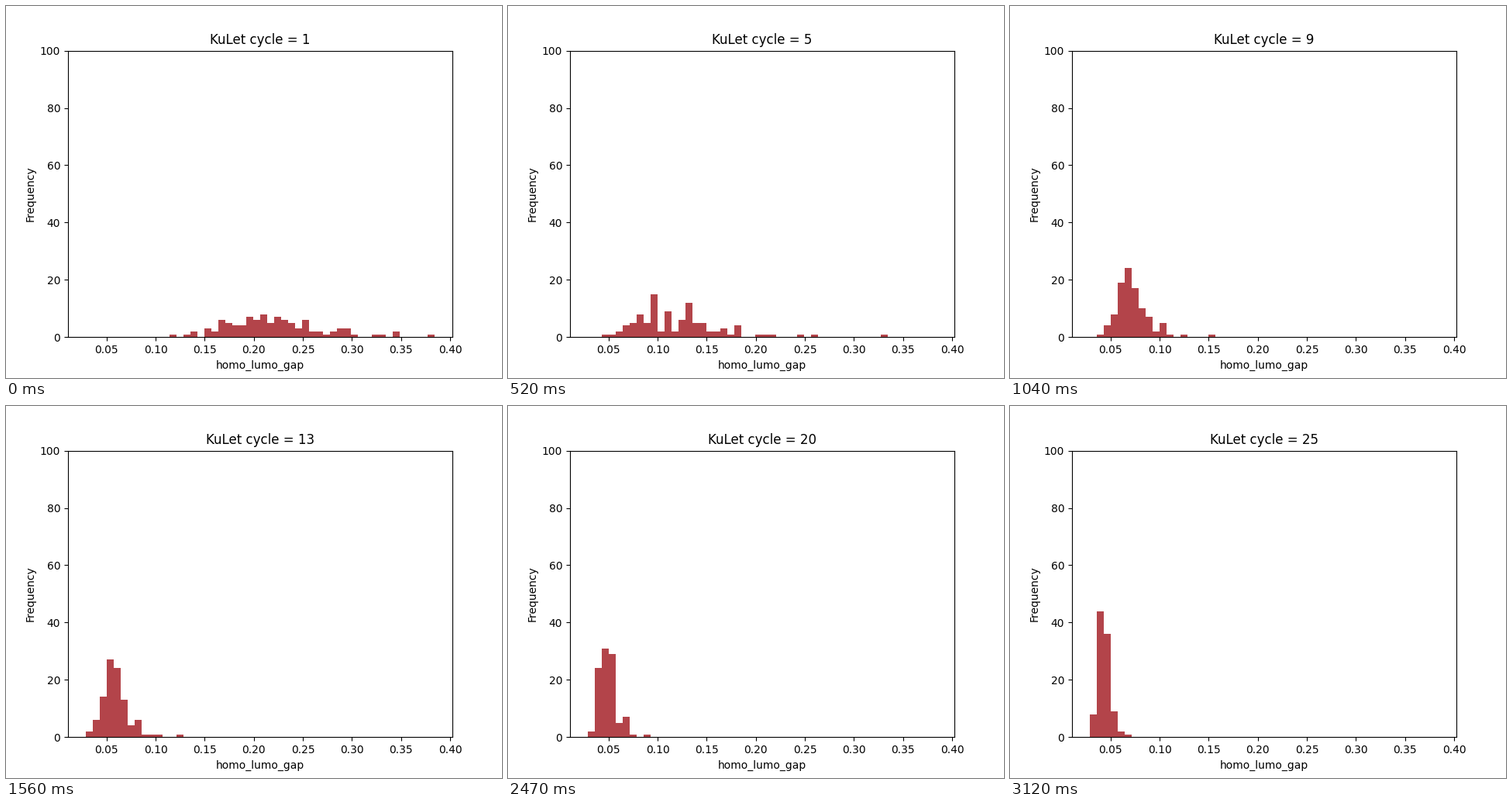
A matplotlib script that plays this animation: 640 by 480 pixels, repeating every 3250 ms.

```python
import numpy as np
import matplotlib.pyplot as plt
from matplotlib.animation import FuncAnimation

CYCLES = 25
BINS = 50
SIZE = 100
LOW, HIGH = 0.028438, 0.384522
WIDTH = (HIGH - LOW) / BINS

# Key points of a shifted log-normal shape, in bin units
SHIFT = 2
KEY_CYCLES = [1, 5, 9, 13, 16, 20, 25]
CENTER = [28.3, 14.1, 7.8, 6.0, 5.4, 4.8, 3.9]
SPREAD = [0.225, 0.37, 0.25, 0.285, 0.265, 0.23, 0.195]


def population(cycle):
    """Evenly spaced quantiles with a little seeded scatter."""
    rng = np.random.default_rng(cycle)
    p = (np.arange(SIZE) + 0.5) / SIZE
    z = 0.6 * np.log(p / (1 - p)) + rng.normal(0, 0.2, SIZE)
    log_center = np.interp(cycle, KEY_CYCLES, np.log(CENTER))
    spread = np.interp(cycle, KEY_CYCLES, SPREAD)
    return np.clip(np.exp(log_center + spread * z) - SHIFT, 0, BINS)


fig, ax = plt.subplots(figsize=(6.4, 4.8), dpi=100)
margin = 0.05 * (HIGH - LOW)
ax.set_xlim(LOW - margin, HIGH + margin)
ax.set_ylim(0, 100)
ax.set_xlabel("homo_lumo_gap")
ax.set_ylabel("Frequency")
title = ax.set_title("")
bars = ax.bar(LOW + WIDTH * np.arange(BINS), np.zeros(BINS), WIDTH,
              align="edge", color="#b3444a")


def update(i):
    cycle = i + 1
    counts, _ = np.histogram(population(cycle), BINS, (0, BINS))
    for bar, count in zip(bars, counts):
        bar.set_height(count)
    title.set_text(f"KuLet cycle = {cycle}")
    return [*bars, title]


anim = FuncAnimation(fig, update, frames=CYCLES, interval=130, repeat=True)
plt.show()
```
